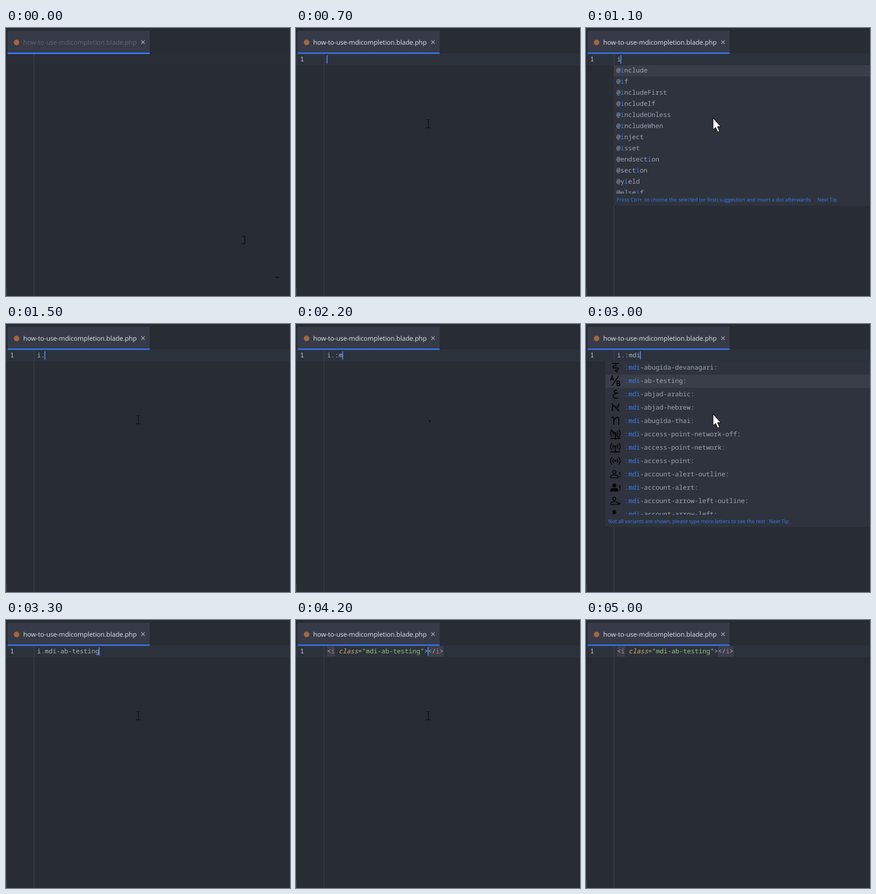
Write an HTML page that moves like this. It is 512 px wide and 482 px high and loops after 5.1 s.

```html
<!DOCTYPE html>
<html lang="en">
<head>
<meta charset="utf-8">
<title>Blade completion</title>
<style>
html, body { margin: 0; width: 100%; height: 100%; overflow: hidden; background: #282c34; }
svg { display: block; width: 512px; height: 482px; }
text { text-rendering: geometricPrecision; white-space: pre; }
.ui { font-family: "Open Sans", "Noto Sans", sans-serif; }
.code { font: 11.667px "Noto Sans Mono", "DejaVu Sans Mono", monospace; fill: #abb2bf; }
.list { fill: #9da5b4; }
.hit, .tip { fill: #3b7df0; }
.tip { font-size: 9.2px; }
.ink { fill: none; stroke: #050608; }
</style>
</head>
<body>
<svg id="stage" viewBox="0 0 512 482" xmlns="http://www.w3.org/2000/svg">
  <defs>
    <clipPath id="clipA"><rect x="50" y="67" width="462" height="231"/></clipPath>
    <clipPath id="clipB"><rect x="35" y="67" width="477" height="276"/></clipPath>
  </defs>
  <rect width="512" height="482" fill="#282c34"/>
  <rect id="line" y="46" width="512" height="21" fill="#2c323b"/>
  <rect x="50" y="47" width="1" height="435" fill="#3d424c"/>
  <rect y="467" width="2" height="15" fill="#343944"/>

  <rect x="3" y="5" width="256" height="42" fill="#363b47"/>
  <rect id="underline" x="3" y="44" width="256" height="2.4" fill="#3574f0"/>
  <circle cx="19" cy="26" r="5" fill="#a5663f"/>
  <text id="title" class="ui" x="31" y="30" font-size="11.65">how-to-use-mdicompletion.blade.php</text>
  <path d="M244 22.5l6 6m0-6l-6 6" fill="none" stroke="#a4a9b3" stroke-width="1.2"/>

  <text id="number" class="code" x="7.5" y="60" style="fill:#c8ccd4">1</text>
  <text id="typed" class="code" x="56" y="60"></text>
  <g id="tag">
    <rect x="56" y="47" width="14" height="19" fill="#3a3f4b"/>
    <rect x="238" y="47" width="28" height="19" fill="#3a3f4b"/>
    <text class="code" x="56" y="60">&lt;<tspan fill="#e06c75">i</tspan> <tspan fill="#d8b06a" font-style="italic">class</tspan><tspan fill="#98c379">="mdi-ab-testing"</tspan>&gt;&lt;/<tspan fill="#e06c75">i</tspan>&gt;</text>
  </g>
  <rect id="caret" y="49" width="1.6" height="15" fill="#528bff"/>

  <g id="popA">
    <rect x="50" y="67" width="462" height="253" fill="#2f333d"/>
    <rect x="50" y="67" width="462" height="20" fill="#3a3e48"/>
    <g id="rowsA" clip-path="url(#clipA)"></g>
    <text class="ui tip" x="55" y="312">Press Ctrl+. to choose the selected (or first) suggestion and insert a dot afterwards</text>
    <text class="ui tip" x="417" y="312">Next Tip</text>
  </g>
  <g id="popB">
    <rect x="35" y="67" width="477" height="298" fill="#2f333d"/>
    <rect id="pick" x="35" y="67" width="477" height="24" fill="#3a3e48"/>
    <g id="rowsB" clip-path="url(#clipB)"></g>
    <text class="ui tip" x="40" y="358">Not all variants are shown, please type more letters to see the rest</text>
    <text class="ui tip" x="330" y="358">Next Tip</text>
  </g>

  <path id="arrow" d="M229 162V183L233.6 178.8L237.4 187L240.8 185.4L237 177.4H243Z" fill="#fff" stroke="#000"/>
  <path id="beam" class="ink" d="M-3.5 -7.5H-1L0 -6.5L1 -7.5H3.5M0 -6.5V6.5M-3.5 7.5H-1L0 6.5L1 7.5H3.5"/>
  <path id="start" class="ink" d="M426 374.5H430.5V388H424.5M485 448.5H492"/>
  <rect id="dot" x="239.5" y="173.5" width="3" height="2.5" fill="#0c0e12"/>
</svg>
<script>
const $ = id => document.getElementById(id);
const LOOP = 5100;

const directives = ["include", "if", "includeFirst", "includeIf", "includeUnless", "includeWhen",
  "inject", "isset", "endsection", "section", "yield", "elseif"];
$("rowsA").innerHTML = directives.map((word, i) => {
  const marked = word.replace("i", '<tspan class="hit">i</tspan>');
  return `<text class="code list" x="55" y="${80 + i * 20}">@${marked}</text>`;
}).join("");

// Icons live in a 20 by 20 box.
const waves = "M7 6.5a5 5 0 0 0 0 7M13 6.5a5 5 0 0 1 0 7M4 3.5a9 9 0 0 0 0 13M16 3.5a9 9 0 0 1 0 13";
const stroke = (d, w = 1.8) => `<path d="${d}" fill="none" stroke="#08090b" stroke-width="${w}"/>`;
const disc = (x, y, r) => `<circle cx="${x}" cy="${y}" r="${r}" fill="#08090b"/>`;
const person = fill => `<g fill="${fill}" stroke="#08090b" stroke-width="1.6">
  <circle cx="8" cy="6.3" r="2.8"/><path d="M1.5 16.5v-2c0-4 13-4 13 0v2z"/></g>`;
const solid = person("#08090b"), outline = person("none");
const bang = stroke("M18 6V11.5M18 13.5V15.5");
const back = stroke("M20 15H15.5M17.5 12.5L15 15L17.5 17.5", 1.4);
const point = stroke(waves) + disc(10, 10, 2);
const network = `<g transform="translate(0 -1.5)">${point}</g>` +
  stroke("M10 9V17M1 18H19") + disc(10, 18, 2);

const icons = [
  ["abugida-devanagari", stroke("M4 3H17M11 3V7H8C5 7 5 11 8 11H13C17 11 16 15 12.5 14.5C9 14 9 17 14 18.5", 2)],
  ["ab-testing", stroke("M1 10L4 1.5L7 10M2 7H6M4 19L16 1M13 11V19H16a2 2 0 0 0 0-4H13H15.5a2 2 0 0 0 0-4Z")],
  ["abjad-arabic", stroke("M13 4C10 2 7 4 8 7C9 9 12 8.5 15 8C8 9 5 12 6 15C7 18 12 18 15 16.5")],
  ["abjad-hebrew", stroke("M3.5 3L17 17M16 3C17 8 14 9 11.5 10.5M6 7C3 10 5 12 4 17", 2)],
  ["abugida-thai", stroke("M3 5C5 2 7 4 7 6V17M7 9L11 5C14 2 16 4 16 7V17", 2)],
  ["access-point-network-off", network + stroke("M2 2L18 18")],
  ["access-point-network", network],
  ["access-point", point],
  ["account-alert-outline", outline + bang],
  ["account-alert", solid + bang],
  ["account-arrow-left-outline", outline + back],
  ["account-arrow-left", solid + back]
];
$("rowsB").innerHTML = icons.map(([name, icon], i) => `
  <g transform="translate(43 ${68 + i * 24})">${icon}</g>
  <text class="code list" x="69.5" y="${82 + i * 24}"><tspan class="hit">:md</tspan><tspan class="last">i</tspan>-${name}:</text>`).join("");
const lastLetters = document.querySelectorAll(".last");

const typing = [[0, ""], [1000, "i"], [1300, "i."], [2000, "i.:"], [2200, "i.:m"],
  [2300, "i.:md"], [2400, "i.:mdi"], [3300, "i.mdi-ab-testing"], [4000, ""]];

const within = (t, a, b) => t >= a && t < b;
const show = (id, on) => $(id).setAttribute("visibility", on ? "visible" : "hidden");
const set = (id, key, value) => $(id).setAttribute(key, value);

function draw(t) {
  const text = typing.filter(([at]) => at <= t).pop()[1];
  const tagged = t >= 4000;
  $("typed").textContent = text;
  show("tag", tagged);

  const dark = within(t, 0, 400) || within(t, 900, 1000) || within(t, 1800, 2000) ||
    within(t, 3800, 4000) || within(t, 4500, 4800) || t >= 5000;
  show("caret", !dark);
  set("caret", "x", tagged ? 237.2 : 56 + text.length * 7 - 0.8);

  set("title", "fill", t < 100 ? "#626873" : t < 200 ? "#a8adb6" : "#e4e7ec");
  set("underline", "height", t < 100 ? 3 : 2.4);
  set("line", "opacity", t < 400 ? 0.25 : 1);
  show("number", t >= 400);

  show("popA", within(t, 1100, 1300));
  show("popB", within(t, 2300, 3300));
  set("pick", "y", t < 2900 ? 67 : 91);
  for (const letter of lastLetters) letter.classList.toggle("hit", t >= 2400);

  show("arrow", within(t, 1100, 1300) || within(t, 2300, 3300));
  show("beam", within(t, 400, 1100) || within(t, 1300, 2200) || within(t, 3300, 4500));
  set("beam", "transform", t < 4400 ? "translate(238.5 172)" : "translate(347.5 431)");
  show("start", t < 100);
  show("dot", within(t, 2200, 2300));
}

function tick() {
  draw(performance.now() % LOOP);
  requestAnimationFrame(tick);
}
tick();
</script>
</body>
</html>
```
